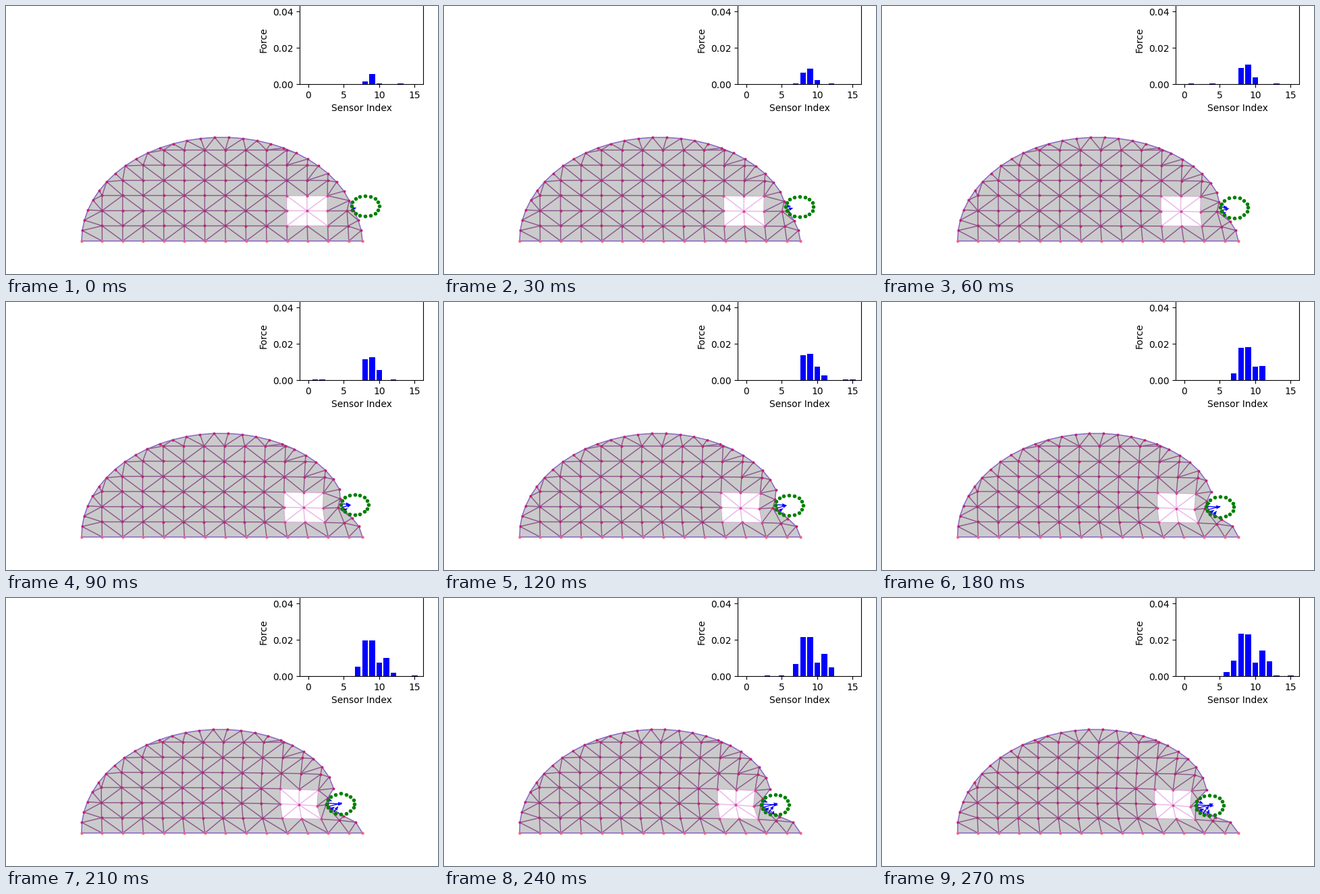
Write a matplotlib script that moves like this. It is 640 by 398 pixels and loops after 300 ms.

```python
import numpy as np
import matplotlib.pyplot as plt
from matplotlib.animation import FuncAnimation
from matplotlib.collections import LineCollection
from matplotlib.tri import Triangulation

W, H = 640, 398
FRAMES, INTERVAL = 10, 30
PX = 0.72  # points per pixel at 100 dpi

# Half-ellipse body and its grid spacing, in pixels
CENTER = np.array([320.0, 349.0])
RADII = np.array([208.0, 154.0])
STEP = np.array([30.45, 22.52])
ARC = 31
HUB = (11, 2)

# Probe path and size
PROBE_START = np.array([532.1, 297.0])
PROBE_SPEED = np.array([-5.2, 1.24])
PROBE_RADII = np.array([20.5, 15.2])


def build_nodes():
    angle = np.pi * np.arange(ARC + 1) / ARC
    unit = np.column_stack([np.cos(angle), -np.sin(angle)])
    unit[-1, 1] = 0
    nodes = list(CENTER + RADII * unit)
    grid = {}
    for j in range(7):
        for i in range(1, 14):
            p = np.array([112 + STEP[0] * i, 349 - STEP[1] * j])
            if np.hypot(*((p - CENTER) / RADII)) < 0.998:
                grid[i, j] = len(nodes)
                nodes.append(p)
    return np.array(nodes), grid


def build_edges(nodes, grid):
    unit = (nodes - CENTER) / RADII
    triangles = []
    for t in Triangulation(unit[:, 0], unit[:, 1]).triangles:
        (ax, ay), (bx, by) = unit[t[1]] - unit[t[0]], unit[t[2]] - unit[t[0]]
        if abs(ax * by - ay * bx) > 1e-6:
            triangles.append(frozenset(int(n) for n in t))

    # Square cells alternate their diagonals; the pattern flips at both ends
    for i, j in grid:
        corners = [(i, j), (i + 1, j), (i + 1, j + 1), (i, j + 1)]
        if not all(c in grid for c in corners):
            continue
        a, b, c, d = (grid[q] for q in corners)
        inside = [t for t in triangles if t <= {a, b, c, d}]
        if len(inside) != 2:
            continue
        for t in inside:
            triangles.remove(t)
        flipped = j in (1, 2) and (i < 3 or i >= HUB[0] - 1)
        if (i + j) % 2 == flipped:
            triangles += [frozenset((a, b, c)), frozenset((a, c, d))]
        else:
            triangles += [frozenset((a, b, d)), frozenset((b, c, d))]

    edges = set()
    for t in triangles:
        a, b, c = sorted(t)
        edges |= {(a, b), (b, c), (a, c)}
    return edges


def final_shift(nodes, grid):
    """Displacement of every node when the probe is fully pressed in."""
    x, y = nodes.T
    height = 349 - y
    dist = np.hypot(x - 500, 1.8 * (y - 303))
    push = 27 * np.exp(-dist / 127) * (1 - np.exp(-height / 18))
    pull = 24 * np.exp(-dist / 45) * np.clip((x - 470) / 30, 0, 1) * (y < 280)
    shift = np.column_stack([-push - 0.2 * pull, push ** 2 / 70 + pull])
    shift[height < 1] = 0

    # Nodes in touch with the probe follow its outline
    pressed = {1: (516, 333), 2: (494, 325.5), 3: (468, 315), 4: (468, 299),
               5: (481, 285), grid[13, 2]: (465, 308), grid[13, 1]: (490, 331)}
    for n, end in pressed.items():
        shift[n] = np.array(end) - nodes[n]
    return shift


def ramp(k, begin, end, power=1.0):
    return np.clip((k - begin) / (end - begin), 0, 1) ** power


def readings(k):
    """Sensor forces: the contact patch widens as the probe goes in."""
    values = np.zeros(16)
    values[np.random.default_rng(k).integers(0, 16, 3)] = 0.0003
    values[6] += 0.0018 * ramp(k, 8, 9)
    values[7] += 0.0084 * ramp(k, 4, 9)
    values[8] = 0.0015 + 0.0217 * ramp(k, 0, 9, 0.7)
    values[9] = 0.0055 + 0.0174 * ramp(k, 0, 9, 0.8)
    values[10] = 0.0003 + 0.007 * ramp(k, 0, 4)
    values[11] += 0.0139 * ramp(k, 3.5, 9, 0.75)
    values[12] += 0.0081 * ramp(k, 6.4, 9)
    return values


nodes, grid = build_nodes()
edges = build_edges(nodes, grid)
shift = final_shift(nodes, grid)

arc = list(range(ARC + 1))
base = [grid[i, 0] for i in range(1, 14)]
outline = arc + base
border = {tuple(sorted(e)) for e in zip(outline, outline[1:] + outline[:1])}

hub = grid[HUB]
ring_steps = [(-1, -1), (0, -1), (1, -1), (1, 0), (1, 1), (0, 1), (-1, 1), (-1, 0)]
ring = [grid[HUB[0] + dx, HUB[1] + dy] for dx, dy in ring_steps]
rim = {tuple(sorted(e)) for e in zip(ring, ring[1:] + ring[:1])}
spokes = {e for e in edges if hub in e}
inner = edges - border - rim - spokes

fig = plt.figure(figsize=(W / 100, H / 100), dpi=100, facecolor="white")

stage = fig.add_axes([0, 0, 1, 1])
stage.set_xlim(0, W)
stage.set_ylim(H, 0)
stage.axis("off")

body, = stage.fill(*nodes[outline].T, color="#cbcbcb", lw=0, zorder=1)
hole, = stage.fill(*nodes[ring].T, color="white", lw=0, zorder=2)


def add_lines(pairs, color, width):
    lines = LineCollection([], colors=color, linewidths=width * PX, zorder=3)
    stage.add_collection(lines)
    return lines, np.array(sorted(pairs))


def add_dots(color, size, zorder):
    return stage.plot([], [], "o", color=color, ms=size * PX, mew=0, zorder=zorder)[0]


line_sets = [add_lines(rim, "#d2b0d6", 1.4),
             add_lines(spokes, "#ebbceb", 1.6),
             add_lines(inner, "#8c5c90", 1.5),
             add_lines(border, "#8c68c8", 1.6)]

base_ids = base + [0, ARC]
hole_ids = ring + [hub]
upper_ids = [n for n in range(len(nodes)) if n not in base_ids + hole_ids]
dot_sets = [(add_dots("#c2246f", 4.0, 4), upper_ids),
            (add_dots("#d8488c", 4.0, 4), hole_ids),
            (add_dots("#ee6486", 4.3, 4), base_ids)]
probe = add_dots("#008000", 5.6, 6)

# One arrow per touched sensor, spread along the probe's left side
touched = np.arange(7, 13)
spread = np.radians(21 * (touched - 8) - 4)
start = 0.95 * PROBE_RADII * np.column_stack([-np.cos(spread), np.sin(spread)])
heading = np.column_stack([np.cos(0.9 * spread), -np.sin(0.9 * spread)])
arrows = stage.quiver(*start.T, *heading.T, color="blue", angles="xy",
                      scale_units="xy", scale=1, units="dots", width=1.3,
                      headwidth=4, headlength=5, headaxislength=4.5,
                      minlength=0.5, zorder=5)

chart = fig.add_axes([435 / W, (H - 116) / H, 183 / W, 132.3 / H])
bars = chart.bar(range(16), np.zeros(16), color="blue")
chart.set_xlim(-1.19, 16.19)
chart.set_ylim(0, 0.049)
chart.set_xticks([0, 5, 10, 15])
chart.set_yticks([0, 0.02, 0.04])
chart.set_xlabel("Sensor Index")
chart.set_ylabel("Force")

turn = 2 * np.pi * np.arange(16) / 16
probe_ring = PROBE_RADII * np.column_stack([np.cos(turn), np.sin(turn)])


def update(k):
    pos = nodes + shift * (k + 0.6) / 9.6
    center = PROBE_START + PROBE_SPEED * k
    force = readings(k)

    body.set_xy(pos[outline])
    hole.set_xy(pos[ring])
    for lines, pairs in line_sets:
        lines.set_segments(pos[pairs])
    for dots, ids in dot_sets:
        dots.set_data(*pos[ids].T)
    probe.set_data(*(center + probe_ring).T)

    arrows.set_offsets(center + start)
    arrows.set_UVC(*(heading * 1120 * force[touched, None]).T)

    for bar, value in zip(bars, force):
        bar.set_height(value)
    return [body, hole, probe, arrows, *bars]


anim = FuncAnimation(fig, update, frames=FRAMES, interval=INTERVAL,
                     repeat=True, repeat_delay=0, blit=False)
plt.show()
```
